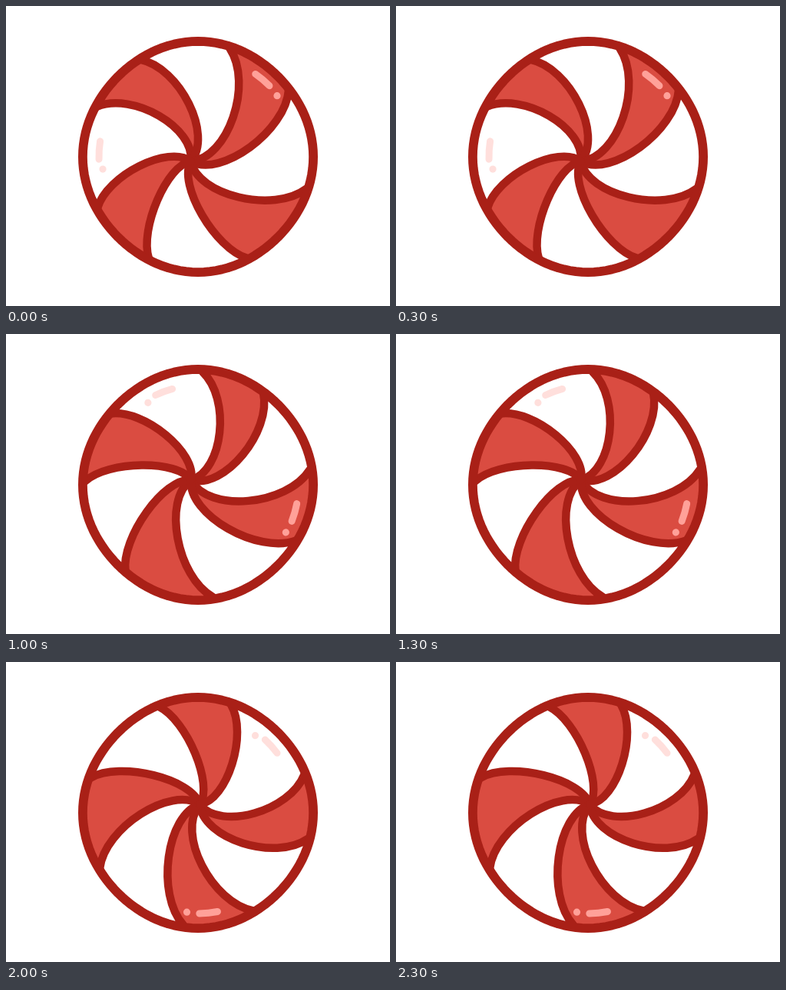
Write an HTML page with a canvas that moves like this. It is 500 px wide and 390 px high and loops after 2500 ms.

```html
<!DOCTYPE html>
<html lang="en">
<head>
<meta charset="utf-8">
<title>Peppermint swirl</title>
<style>
html, body { margin: 0; width: 100%; height: 100%; overflow: hidden; background: #fff; }
canvas { display: block; }
</style>
</head>
<body>
<canvas id="stage" width="500" height="390"></canvas>
<script>
const ctx = document.getElementById('stage').getContext('2d');
const LINE = '#a92017', RED = '#da4c41', PINK = '#ffa199', PALE = '#ffdfdc';
const STEP = 500;
const TURNS = [0, 25, 66, 89, 134];
const TIP_RADIUS = 147;

const rad = degrees => degrees * Math.PI / 180;
const polar = (radius, degrees) => ({
  x: radius * Math.cos(rad(degrees)),
  y: radius * Math.sin(rad(degrees))
});

const HUB = polar(11, 148);

// Each pair of arms encloses one red stripe; bend is the bulge relative to length.
const arm = (angle, bend) => ({ angle, bend, tip: polar(TIP_RADIUS, angle) });
const STRIPES = [
  [arm(206.3, 0.215), arm(239.3, 0.21)],
  [arm(286.3, 0.215), arm(323.5, 0.195)],
  [arm(16.5, 0.2), arm(64, 0.155)],
  [arm(115.8, 0.145), arm(153, 0.18)]
];

// Point placed along the hub-to-tip chord, pushed sideways by the bend.
function bendPoint({ tip, bend }, along) {
  const dx = tip.x - HUB.x, dy = tip.y - HUB.y;
  const side = bend * 4 / 3;
  return [HUB.x + dx * along - dy * side, HUB.y + dy * along + dx * side];
}

function curveOut(a) {
  ctx.moveTo(HUB.x, HUB.y);
  ctx.bezierCurveTo(...bendPoint(a, 0.12), ...bendPoint(a, 0.78), a.tip.x, a.tip.y);
}

function curveBack(a) {
  ctx.bezierCurveTo(...bendPoint(a, 0.78), ...bendPoint(a, 0.12), HUB.x, HUB.y);
}

function fillStripe([first, second]) {
  ctx.fillStyle = RED;
  ctx.beginPath();
  curveOut(first);
  ctx.arc(0, 0, TIP_RADIUS, rad(first.angle), rad(second.angle));
  curveBack(second);
  ctx.fill();
}

function strokeArm(a) {
  ctx.beginPath();
  curveOut(a);
  ctx.stroke();
}

// The rim is very slightly squeezed on its diagonals.
function strokeRim() {
  ctx.beginPath();
  for (let angle = 0; angle < 360; angle += 3) {
    const p = polar(148.8 + 1.3 * Math.cos(rad(4 * angle)), angle);
    ctx.lineTo(p.x, p.y);
  }
  ctx.closePath();
  ctx.stroke();
}

function glint(color, radius, angle, dotRadius, dotAngle) {
  ctx.strokeStyle = ctx.fillStyle = color;
  ctx.lineWidth = 9;
  ctx.beginPath();
  ctx.arc(0, 0, radius, rad(angle - 5.2), rad(angle + 5.2));
  ctx.stroke();
  const dot = polar(dotRadius, dotAngle);
  ctx.beginPath();
  ctx.arc(dot.x, dot.y, 4.6, 0, 2 * Math.PI);
  ctx.fill();
}

function draw(turn) {
  ctx.fillStyle = '#fff';
  ctx.fillRect(0, 0, 500, 390);
  ctx.lineCap = ctx.lineJoin = 'round';
  ctx.save();
  ctx.translate(250, 196);

  ctx.save();
  ctx.rotate(rad(turn));
  STRIPES.forEach(fillStripe);
  ctx.strokeStyle = LINE;
  ctx.lineWidth = 10.5;
  STRIPES.flat().forEach(strokeArm);
  ctx.restore();

  ctx.strokeStyle = LINE;
  ctx.lineWidth = 11.8;
  strokeRim();

  ctx.rotate(rad(turn));
  glint(PINK, 131, 310, 130, 322.4);
  glint(PALE, 129, 183.8, 125, 172.6);
  ctx.restore();
}

function tick() {
  draw(TURNS[Math.floor(performance.now() / STEP) % TURNS.length]);
  requestAnimationFrame(tick);
}
tick();
</script>
</body>
</html>
```
